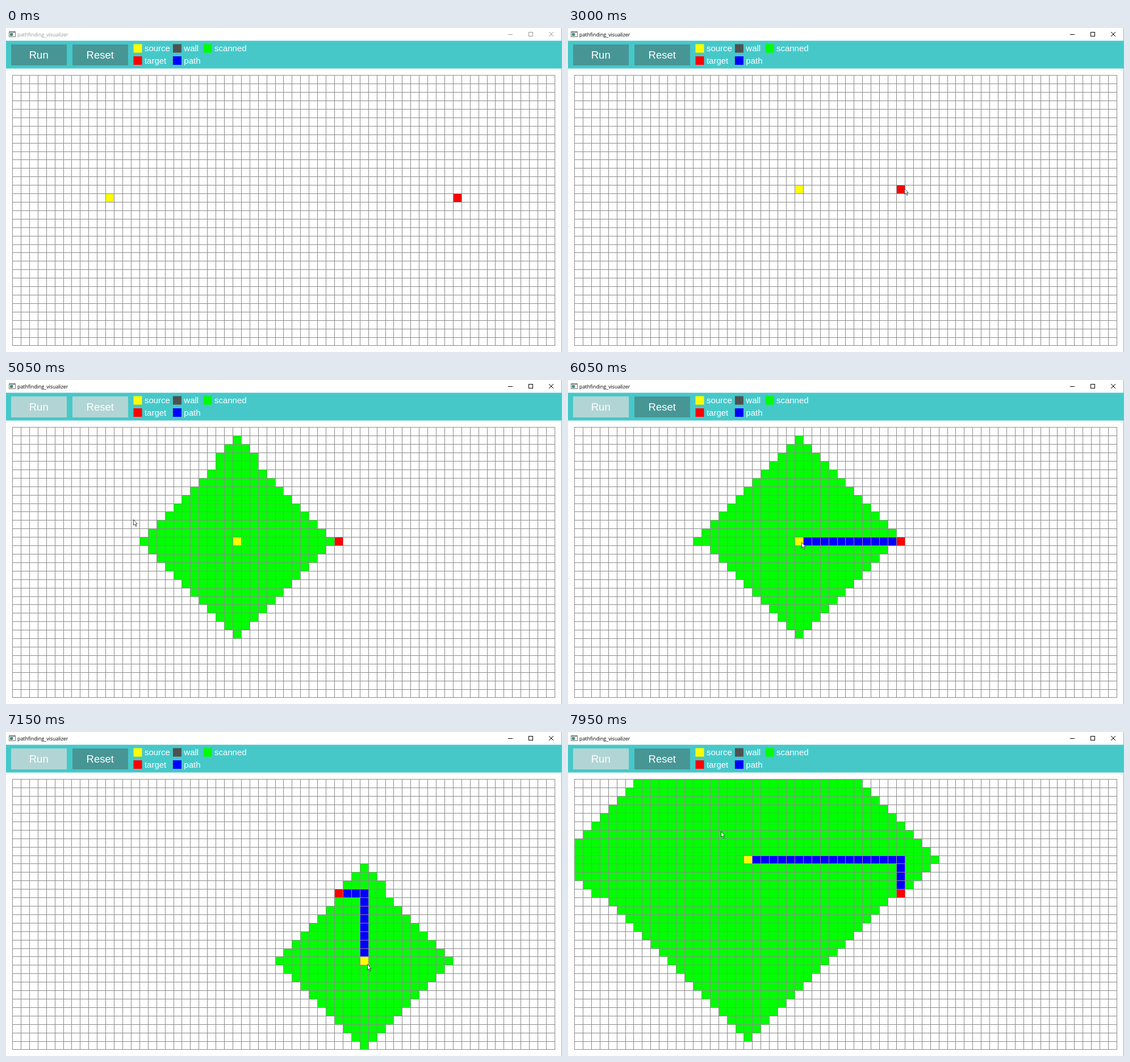
Write an HTML page with a canvas that moves like this. It is 979 by 572 pixels and loops after 8000 ms.

```html
<!DOCTYPE html>
<html lang="en">
<head>
<meta charset="utf-8">
<title>pathfinding_visualizer</title>
<style>
  html, body { margin: 0; width: 979px; height: 572px; overflow: hidden; background: #fefefe; }
  canvas { display: block; }
</style>
</head>
<body>
<canvas id="stage" width="979" height="572"></canvas>
<script>
const W = 979, H = 572;
const ctx = document.getElementById('stage').getContext('2d');
const LOOP = 8000, STEP = 50, LAG = 100;
const COLS = 64, ROWS = 32, LEFT = 11.05, TOP = 83.35, PITCH_X = 14.92, PITCH_Y = 14.91;
const SCAN_START = 3800, SCAN_RATE = 0.2158;
const ARIAL = '"Liberation Sans", Arial, sans-serif';

const lineX = c => Math.round(LEFT + PITCH_X * c);
const lineY = r => Math.round(TOP + PITCH_Y * r);
const cellAt = ([x, y]) => ({
  c: Math.floor((x - LEFT) / PITCH_X),
  r: Math.floor((y - TOP) / PITCH_Y)
});

// The pointer glides to each place in turn and rests in between.
const entry = [972, 150], runButton = [62, 48];
const moves = [];
const glide = (start, end, place) => moves.push({ start, end, place });
glide(150, 550, runButton);
glide(550, 950, [183, 300]);
glide(1050, 1400, [404, 289]);
glide(1650, 2200, [799, 307]);
glide(2250, 2900, [592, 283]);
glide(3150, 3650, runButton);
glide(3850, 4350, [224, 246]);
glide(5400, 6000, [411, 286]);
glide(6200, 6450, [330, 343]);
glide(6450, 6700, [481, 434]);
glide(6700, 7100, [657, 406]);
glide(7100, 7450, [510, 431]);
glide(7450, 7950, [269, 175]);

function pointerAt(t) {
  let at = entry;
  for (const { start, end, place } of moves) {
    if (t <= start) break;
    const p = Math.min(1, (t - start) / (end - start));
    at = at.map((v, i) => v + (place[i] - v) * p);
  }
  return at;
}

// A dragged cell follows the pointer with a short delay.
const draggedCell = t => cellAt(pointerAt(t - LAG));

function sourceAt(t) {
  if (t < 1150) return { c: 11, r: 14 };
  if (t < 1500) return draggedCell(t);
  return t < 6300 ? { c: 26, r: 13 } : draggedCell(t);
}

function targetAt(t) {
  if (t < 2350) return { c: 52, r: 14 };
  return t < 3000 ? draggedCell(t) : { c: 38, r: 13 };
}

// Cells in visiting order: by distance, then row, then column.
function scan(from, to) {
  const dist = (c, r) => Math.abs(c - from.c) + Math.abs(r - from.r);
  const goal = dist(to.c, to.r), cells = [];
  for (let r = 0; r < ROWS; r++) {
    for (let c = 0; c < COLS; c++) {
      const d = dist(c, r);
      const beforeGoal = r < to.r || r === to.r && c <= to.c;
      if (d && (d < goal || d === goal && beforeGoal)) cells.push({ c, r, d });
    }
  }
  return cells.sort((a, b) => a.d - b.d);
}

function route(from, to) {
  const corner = { c: from.r < to.r ? to.c : from.c, r: Math.min(from.r, to.r) };
  const cells = [], at = { ...from };
  for (const stop of [corner, to]) {
    while (at.c !== stop.c || at.r !== stop.r) {
      at.c += Math.sign(stop.c - at.c);
      at.r += Math.sign(stop.r - at.r);
      cells.push({ ...at });
    }
  }
  return cells;
}

function box(x, y, w, h, color) {
  ctx.fillStyle = color;
  ctx.fillRect(x, y, w, h);
}

function text(str, x, y, font, color, align = 'left') {
  ctx.font = font;
  ctx.textAlign = align;
  ctx.fillStyle = color;
  ctx.fillText(str, x, y);
  return ctx.measureText(str).width;
}

function fillCell({ c, r }, color) {
  const x = lineX(c), y = lineY(r);
  box(x, y, lineX(c + 1) - x, lineY(r + 1) - y, color);
}

function drawTitleBar(active) {
  const ink = active ? '#000' : '#999';
  box(0, 0, W, 23, '#fff');
  box(5, 6, 12, 10, '#777');
  box(6, 8, 10, 7, '#fff');
  box(7, 9, 5, 5, '#3b8d84');
  text('pathfinding_visualizer', 20, 15, '8.8px "Open Sans", "Noto Sans", sans-serif', ink);
  box(884, 11, 8, 1, ink);
  ctx.strokeStyle = ink;
  ctx.lineWidth = 1;
  ctx.strokeRect(920.5, 7.5, 7, 7);
  ctx.stroke(new Path2D('M956 7l8 8m0-8l-8 8'));
}

function drawButton(label, x, disabled, [px, py]) {
  const hover = px >= x && px < x + 98 && py >= 29 && py < 66;
  box(x, 29, 98, 37, disabled ? '#b1d5d4' : hover ? '#5fa5a4' : '#479695');
  text(label, x + 48.7, 54, '18.5px ' + ARIAL, '#fff', 'center');
}

function drawLegend() {
  const columns = [
    { source: '#ff0', target: '#f00' },
    { wall: '#505050', path: '#00f' },
    { scanned: '#0f0' }
  ];
  let x = 224.5;
  for (const column of columns) {
    const widths = Object.entries(column).map(([label, color], row) => {
      const y = 28.5 + 21.5 * row;
      box(x, y, 15, 15, color);
      return text(label, x + 19.4, y + 12.5, '15px ' + ARIAL, '#fff');
    });
    x += 24.4 + Math.max(...widths);
  }
}

function drawGrid(t) {
  const source = sourceAt(t), target = targetAt(t);
  if (t > SCAN_START) {
    const scanned = scan(source, target);
    const count = Math.floor((t - SCAN_START) * SCAN_RATE);
    scanned.slice(0, count).forEach(cell => fillCell(cell, '#0f0'));
    route(source, target).slice(0, Math.max(0, count - scanned.length))
      .forEach(cell => fillCell(cell, '#00f'));
  }
  fillCell(source, '#ff0');
  fillCell(target, '#f00');
  const x = lineX(0), y = lineY(0), w = lineX(COLS) - x + 1, h = lineY(ROWS) - y + 1;
  for (let c = 0; c <= COLS; c++) box(lineX(c), y, 1, h, '#8c8c8c');
  for (let r = 0; r <= ROWS; r++) box(x, lineY(r), w, 1, '#8c8c8c');
}

const arrow = new Path2D('M0 0V10L2.3 8L4 12L5.5 11.3L3.9 7.5H6.8Z');
function drawPointer([x, y]) {
  ctx.save();
  ctx.translate(x + 0.5, y + 0.5);
  ctx.fillStyle = '#fff';
  ctx.fill(arrow);
  ctx.strokeStyle = '#222';
  ctx.lineWidth = 0.8;
  ctx.stroke(arrow);
  ctx.restore();
}

function draw(t) {
  const tip = pointerAt(t);
  box(0, 0, W, H, '#fefefe');
  drawTitleBar(t >= 1050);
  box(0, 22.5, W, 49, '#46c8c9');
  drawButton('Run', 9, t >= 3850, tip);
  drawButton('Reset', 117, t >= 3850 && t < 5250, tip);
  drawLegend();
  drawGrid(t);
  box(W - 1, 0, 1, H, '#aaa');
  if (t >= 150) drawPointer(tip);
}

let shown = -1;
function tick() {
  const t = Math.floor(performance.now() % LOOP / STEP) * STEP;
  if (t !== shown) draw(shown = t);
  requestAnimationFrame(tick);
}
tick();
</script>
</body>
</html>
```
